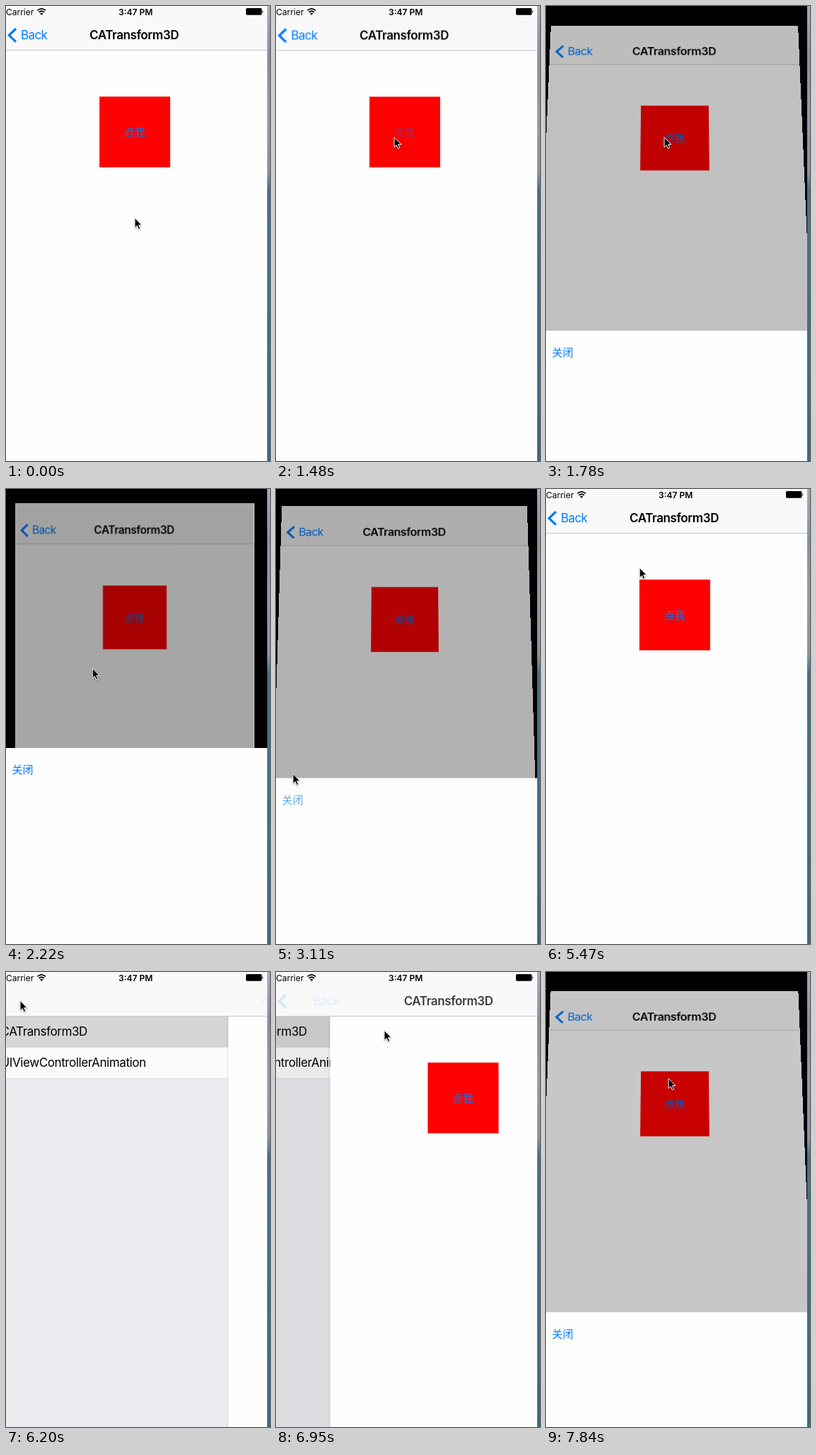
Write an HTML page that moves like this. It is 373 px wide and 643 px high and loops after 7.99 s.

```html
<!DOCTYPE html>
<html lang="en">
<head>
<meta charset="utf-8">
<style>
  html, body { margin: 0; width: 373px; height: 643px; overflow: hidden; background: #000; }
  body { position: relative; font: 17px/20px Inter, "Noto Sans CJK SC", "Noto Sans CJK", sans-serif; letter-spacing: -.4px; }
  div, svg { position: absolute; white-space: nowrap; }
  svg { overflow: visible; }
  #stage { left: 0; top: 0; width: 373px; height: 643px; overflow: hidden; }
  #page { left: -6px; top: -1px; width: 375px; height: 667px; overflow: hidden; background: #fefefe; }
  #inner { left: 6px; top: 1px; }
  #list, #shade, #view { left: -6px; top: 63px; width: 375px; height: 604px; }
  #list { background: #efeff4; }
  #shade { background: #000; }
  #view { background: #fefefe; box-shadow: 0 0 5px rgba(0,0,0,.15); }
  .cell { left: 0; width: 360px; height: 43px; padding-left: 15px; line-height: 43px; background: #fff; border-bottom: 1px solid #e2e2e4; }
  #box { left: 137.5px; top: 65px; width: 100px; height: 100px; background: #f00; }
  .btn { font: 15px/20px "Noto Sans CJK SC", "Noto Sans CJK", sans-serif; letter-spacing: 0; color: #007aff; }
  #tap { left: 35px; top: 40px; }
  #nav { left: -6px; top: -1px; width: 375px; height: 63px; background: #f9f9f9; border-bottom: 1px solid #c8c8ca; }
  #title { left: 118px; top: 30.6px; font-weight: 600; }
  #back { left: 21px; top: 30.6px; color: #007aff; letter-spacing: -.6px; }
  #chevron { left: 0; top: .5px; }
  #dim { left: -6px; top: -1px; width: 375px; height: 667px; background: #000; }
  #sheet { left: -6px; top: 366px; width: 375px; height: 300px; background: #fefefe; }
  #close { left: 14.4px; top: 19.7px; }
  .status { top: 0; font-size: 12px; line-height: 17px; letter-spacing: 0; }
  #wall { left: 369px; top: 0; width: 4px; height: 643px;
    background: linear-gradient(#a3adba, #8793a4 70px, #929cab 150px, #8a94a3 235px, #44718e 260px, #3b7394 400px, #356a8b); }
  #cursor { filter: drop-shadow(0 1px 1px rgba(0,0,0,.35)); }
</style>
</head>
<body>
<div id="stage">
  <div id="page"><div id="inner">
    <div id="list">
      <div class="cell" id="row">CATransform3D</div>
      <div class="cell" style="top:44px">UIViewControllerAnimation</div>
    </div>
    <div id="shade"></div>
    <div id="view"><div id="box"><div id="tap" class="btn">点我</div></div></div>
    <div id="nav"></div>
    <svg id="chevron" width="20" height="60"><path d="M14 31 4.3 40.3 14 49.6" fill="none" stroke="#007aff" stroke-width="3.2"/></svg>
    <div id="back">Back</div>
    <div id="title">CATransform3D</div>
    <div id="dim"></div>
  </div></div>
  <div id="sheet"><div id="close" class="btn">关闭</div></div>
  <div class="status" style="left:0">Carrier</div>
  <div class="status" style="left:159px;font-weight:600">3:47 PM</div>
  <svg width="373" height="20">
    <path d="M44.4 6.4Q50.2 1.4 56 6.4M46.5 8.9Q50.2 5.6 53.9 8.9" fill="none" stroke="#000" stroke-width="1.7"/>
    <path d="M50.2 13 48 10.6Q50.2 8.8 52.4 10.6Z"/>
    <rect x="339" y="3" width="22.5" height="9.8" rx="1.8"/>
    <path d="M362.3 6Q364.2 8 362.3 10Z"/>
  </svg>
  <div id="wall"></div>
  <svg id="cursor" width="14" height="20">
    <path d="M0 .5V14.5L3.2 11.6 5.4 16.5 7.7 15.5 5.6 10.7H10Z" fill="#000" stroke="#fff"/>
  </svg>
</div>
<script>
const LOOP = 7990, STEP = LOOP / 54;
const OPEN = 1448, CLOSE = 2984, POP = 5830, PUSH = 6756, REOPEN = 7541;
const SLIDE = 520, NAVIGATE = 500;

// Pointer legs: leave, arrive, x, y
const legs = [
  [0, 0, 182, 299],
  [520, 890, 167, 185],
  [2000, 2700, 24, 402],
  [3110, 3400, 67, 367],
  [3400, 3700, 168, 210],
  [3700, 4720, 331, 633],
  [5050, 5470, 134, 112],
  [5470, 5770, 20, 40],
  [6150, 6660, 153, 82],
  [7100, 7540, 173, 150]
];

const clamp = x => Math.min(1, Math.max(0, x));
const span = (t, from, length) => clamp((t - from) / length);
const smooth = x => x * x * (3 - 2 * x);
const easeOut = x => 1 - (1 - x) ** 3;

const style = id => document.getElementById(id).style;
const move = (id, x, y = 0) => style(id).transform = `translate(${x}px, ${y}px)`;
const fade = (id, value) => style(id).opacity = clamp(value);

// Opacity of a button that is touched at a time and then recovers.
const touched = (t, time) => t < time ? 1 : .3 + .7 * span(t, time, 300);

function drawPointer(t) {
  let x = 0, y = 0;
  for (const [leave, arrive, toX, toY] of legs) {
    const p = arrive ? span(t, leave, arrive - leave) : 1;
    x += (toX - x) * p;
    y += (toY - y) * p;
  }
  move("cursor", x, y);
}

// The page first tilts back, then straightens while it shrinks; closing runs the same in reverse.
function drawSheet(t) {
  const u = span(t, OPEN, SLIDE) - span(t, CLOSE, SLIDE) + span(t, REOPEN, SLIDE);
  const shown = smooth(u), turn = .64;
  const lean = smooth(clamp(u / turn)), settle = smooth(span(u, turn, 1 - turn));

  move("sheet", 0, 300 * (1 - shown));
  fade("dim", .35 * shown);
  style("page").transform = `translateY(${-12 * settle}px) perspective(900px)
    rotateX(${11.5 * (lean - settle)}deg) scale(${1 - .1 * settle})`;
  fade("tap", Math.min(touched(t, OPEN), t < PUSH ? 1 : touched(t, REOPEN)));
  fade("close", touched(t, CLOSE - 25));
}

function drawNavigation(t) {
  const away = easeOut(span(t, POP, NAVIGATE)) - easeOut(span(t, PUSH, NAVIGATE));
  const x = 375 * away;

  move("view", x);
  move("list", -.3 * (375 - x));
  fade("shade", .1 * (1 - away));
  move("title", x * .76);
  fade("title", 1 - x / 330);
  move("back", x * .38);
  fade("back", 1 - x / 91);
  fade("chevron", 1 - x / 98);

  const selected = 1 - span(t, 6100, 350) + span(t, 6600, 50);
  const grey = 255 - 38 * selected;
  style("row").backgroundColor = `rgb(${grey}, ${grey}, ${grey})`;
}

const start = performance.now();
function tick() {
  const now = (performance.now() - start) % LOOP;
  const t = Math.floor((now + 5) / STEP) * STEP % LOOP;
  drawPointer(t);
  drawSheet(t);
  drawNavigation(t);
  requestAnimationFrame(tick);
}
tick();
</script>
</body>
</html>
```
